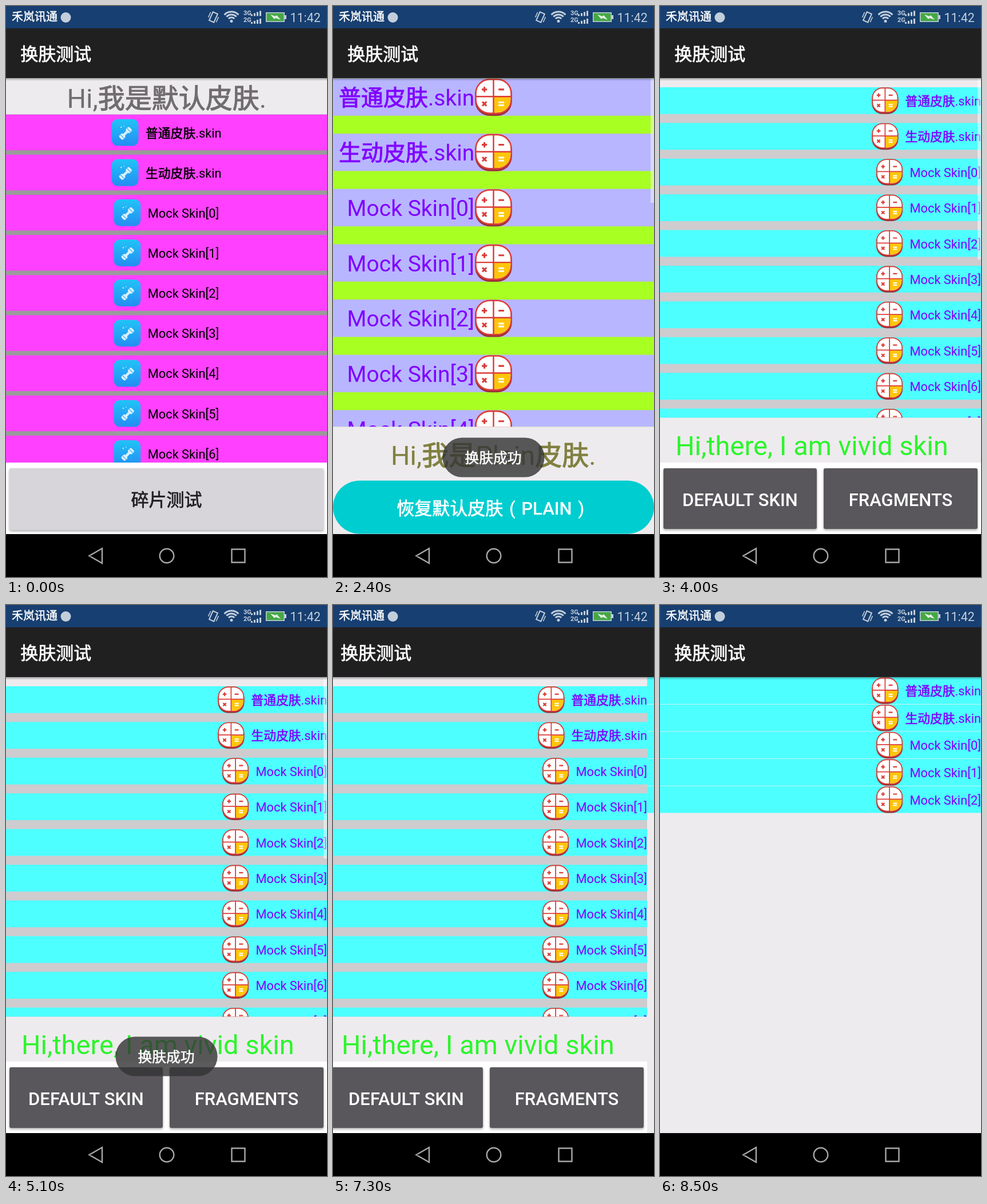
An HTML page with a canvas that plays this animation: 561 by 998 pixels, repeating every 8700 ms.

```html
<!DOCTYPE html>
<html lang="zh-CN">
<head>
<meta charset="utf-8">
<title>换肤测试</title>
<style>
html, body { margin: 0; width: 100%; height: 100%; overflow: hidden; background: #000; }
canvas { display: block; width: 561px; height: 998px; }
</style>
</head>
<body>
<canvas id="stage" width="561" height="998"></canvas>
<script>
const ctx = document.getElementById('stage').getContext('2d');
const W = 561, LOOP = 8700;
const PAPER = '#eeebee', VIOLET = '#8000ff', CYAN = '#4dffff', PALE = '#c3cedb';
const FONT = 'Roboto, "Noto Sans CJK SC", "Noto Sans CJK", sans-serif';
const names = ['普通皮肤.skin', '生动皮肤.skin', ...Array.from({ length: 8 }, (_, i) => `Mock Skin[${i}]`)];

const clamp = v => Math.max(0, Math.min(1, v));

function rect(x, y, w, h, color) {
  ctx.fillStyle = color;
  ctx.fillRect(x, y, w, h);
}

function pill(x, y, w, h, r, color) {
  ctx.fillStyle = color;
  ctx.beginPath();
  ctx.roundRect(x, y, w, h, r);
  ctx.fill();
}

// Han runs get a thin stroke, for a weight between regular and bold
function text(str, x, y, size, color, weight = 400, align = 'left') {
  ctx.font = `${weight} ${size}px ${FONT}`;
  ctx.fillStyle = ctx.strokeStyle = color;
  ctx.lineWidth = size * 0.024;
  const runs = str.match(/\p{Script=Han}+|\P{Script=Han}+/gu);
  const widths = runs.map(run => ctx.measureText(run).width);
  const total = widths.reduce((a, b) => a + b);
  x -= { left: 0, center: total / 2, right: total }[align];
  runs.forEach((run, i) => {
    ctx.fillText(run, x, y);
    if (/\p{Script=Han}/u.test(run)) ctx.strokeText(run, x, y);
    x += widths[i];
  });
}

function line(color, width, ...points) {
  ctx.strokeStyle = color;
  ctx.lineWidth = width;
  ctx.beginPath();
  for (let i = 0; i < points.length; i += 4) {
    ctx.moveTo(points[i], points[i + 1]);
    ctx.lineTo(points[i + 2], points[i + 3]);
  }
  ctx.stroke();
}

function at(x, y, scale, draw) {
  ctx.save();
  ctx.translate(x, y);
  ctx.scale(scale, scale);
  draw();
  ctx.restore();
}

function clipped(y, h, draw) {
  ctx.save();
  ctx.beginPath();
  ctx.rect(0, y, W, h);
  ctx.clip();
  draw();
  ctx.restore();
}

// Icons use a 64-unit box
function calculator(x, y, size) {
  at(x, y, size / 64, () => {
    const red = '#dc3c38';
    pill(0.5, 3, 63, 61, 25, '#9c3038');
    pill(0.5, 0.5, 63, 60.5, 25, red);
    ctx.save();
    ctx.beginPath();
    ctx.roundRect(3, 3, 58, 55.5, 22.5);
    ctx.clip();
    rect(0, 0, 64, 64, '#fff');
    rect(32, 31, 32, 33, '#fdc60c');
    ctx.restore();
    line(red, 2.4, 32, 2, 32, 60, 2, 31, 62, 31);
    line(red, 3, 12, 19, 21, 19, 16.5, 14.5, 16.5, 23.5, 40.5, 19, 50, 19,
      13, 40, 20, 47, 20, 40, 13, 47);
    line('#fff', 3, 40.5, 41, 50, 41, 40.5, 46, 50, 46);
  });
}

function blueIcon(x, y, size) {
  at(x, y, size / 64, () => {
    const blue = ctx.createLinearGradient(0, 0, 0, 64);
    blue.addColorStop(0, '#20c4f6');
    blue.addColorStop(1, '#258cf2');
    pill(0, 0, 64, 64, 14, blue);
    ctx.translate(33, 34);
    ctx.rotate(-0.78);
    const glyph = '#d9f1ff';
    pill(-17, -6.5, 12, 13, 4, glyph);
    pill(5, -6.5, 12, 13, 4, glyph);
    rect(-6, -3, 12, 6, glyph);
    line('#2ea8f4', 1.5, -11, -6, -11, 6, 11, -6, 11, 6);
    ctx.rotate(0.78);
    rect(-12, -16, 3, 3, '#bfe8ff');
    rect(-5, -18, 2, 2, '#bfe8ff');
  });
}

function button(x, y, w, h, color, label, textColor) {
  ctx.save();
  ctx.shadowColor = 'rgba(0,0,0,.35)';
  ctx.shadowBlur = 4;
  ctx.shadowOffsetY = 2;
  pill(x, y, w, h, 3, color);
  ctx.restore();
  text(label, x + w / 2, 874, 31, textColor, 500, 'center');
}

function scrollbar(height, alpha) {
  rect(555, 126, 6, height, `rgba(255,255,255,${0.5 * alpha})`);
}

function appBar() {
  rect(0, 39, W, 87, '#212021');
  text('换肤测试', 25.3, 95, 31, '#fff');
  const shade = ctx.createLinearGradient(0, 126, 0, 131);
  shade.addColorStop(0, 'rgba(0,0,0,.3)');
  shade.addColorStop(1, 'rgba(0,0,0,0)');
  rect(0, 126, W, 5, shade);
}

function defaultSkin() {
  rect(0, 126, W, 672, PAPER);
  text('Hi,我是默认皮肤.', 106.5, 178, 47, '#706d70');
  clipped(189.5, 608.5, () => {
    rect(0, 189, W, 609, '#9b9a9b');
    names.slice(0, 9).forEach((name, i) => {
      const y = 189.7 + i * 70.15, inset = i < 2 ? 0 : 3.8;
      rect(0, y, W, 62.4, '#ff40ff');
      blueIcon(184.7 + inset, y + 8, 46.8);
      text(name, 244 + inset, y + 39.8, 21.8, '#000');
    });
  });
  rect(0, 798, W, 125, '#fff');
  button(6, 808, 549, 108, '#d7d5d9', '碎片测试', '#201f20');
}

function plainSkin(t) {
  clipped(126, 609.5, () => {
    rect(0, 126, W, 610, '#a8ff22');
    names.slice(0, 7).forEach((name, i) => {
      const y = 126.4 + i * 96.65;
      rect(0, y, W, 65.4, '#b8b6ff');
      text(name, 247.2, y + 47.3, 39, VIOLET, 400, 'right');
      calculator(247.7, y, 65.6);
    });
  });
  scrollbar(218, 1 - clamp((t - 2380) / 300));
  rect(0, 735.5, W, 188, PAPER);
  text('Hi,我是Plain皮肤.', 101, 802, 47, '#808040');
  pill(0, 829.5, W, 93, 46.5, '#00cdd0');
  text('恢复默认皮肤\u2004(\u2004PLAIN\u2004)\u2004', 280.5, 889, 31, '#fff', 500, 'center');
}

function vividRow(name, y, i) {
  rect(0, y, W, 46.8, CYAN);
  calculator(i < 2 ? 370 : 377.7, y, 46.8);
  text(name, W, y + 32, 21.8, VIOLET, 400, 'right');
}

function vividSkin(t) {
  rect(0, 126, W, 672, PAPER);
  clipped(126, 593.5, () => {
    rect(0, 142, W, 578, '#cecccf');
    names.forEach((name, i) => vividRow(name, 142 + i * 62.4, i));
  });
  scrollbar(317, 1 - clamp((t - 5080) / 300));
  text('Hi,there, I am vivid skin', 27, 785, 47, '#2cf52c');
  rect(0, 798, W, 125, '#fff');
  button(6, 808, 268, 106, '#59575b', 'DEFAULT SKIN', '#fff');
  button(286, 808, 269, 106, '#59575b', 'FRAGMENTS', '#fff');
}

function fragments() {
  rect(0, 126, W, 797, PAPER);
  names.slice(0, 5).forEach((name, i) => vividRow(name, 126.2 + i * 47.6, i));
}

function page(x, content, t) {
  at(x, 0, 1, () => {
    content(t);
    appBar();
  });
}

function statusBar() {
  rect(0, 0, W, 39, '#173f71');
  text('禾岚讯通', 10, 26, 20, '#fff', 500);
  pill(95.5, 11, 18, 18, 9, PALE);

  ctx.strokeStyle = PALE;
  ctx.lineWidth = 2;
  at(362.5, 19.5, 1, () => {
    ctx.rotate(0.42);
    ctx.strokeRect(-4.5, -8, 9, 16);
    line(PALE, 1.5, -8, -6, -8, 4, 8, -4, 8, 6);
  });
  ctx.lineWidth = 3;
  for (const r of [7, 12, 17]) {
    ctx.beginPath();
    ctx.arc(394, 27, r, -Math.PI * 0.76, -Math.PI * 0.24);
    ctx.stroke();
  }
  pill(391.5, 24, 5, 5, 2.5, PALE);

  text('3G', 415, 15.5, 11, PALE, 700);
  text('2G', 415, 27.5, 11, PALE, 700);
  for (let i = 0; i < 4; i++) {
    const h = 3 + i * 2;
    rect(428 + i * 5, 17.5 - h, 3, h, PALE);
    rect(428 + i * 5, 31 - h, 3, h, PALE);
  }

  rect(454, 11, 33, 17, PALE);
  rect(487, 16, 3, 7, PALE);
  rect(455.5, 12.5, 30, 14, '#45a845');
  ctx.fillStyle = '#e4f3e4';
  ctx.fill(new Path2D('M462 15 L471 18 L473 16 L480 24 L471 21 L469 23 Z'));
  text('11:42', 496.5, 28, 21.4, PALE);
}

function navBar() {
  rect(0, 923, W, 75, '#000');
  ctx.strokeStyle = '#a9a8a9';
  ctx.lineWidth = 2.4;
  ctx.beginPath();
  ctx.moveTo(145.5, 961);
  ctx.lineTo(168, 948);
  ctx.lineTo(168, 974);
  ctx.closePath();
  ctx.moveTo(293.5, 961);
  ctx.arc(281, 961, 12.3, 0, Math.PI * 2);
  ctx.rect(394.5, 949.5, 23, 23);
  ctx.stroke();
}

function toast(t, start) {
  const enter = clamp((t - start) / 500), leave = clamp((t - start - 1700) / 500);
  const alpha = (1 - (1 - enter) ** 2) * (1 - leave ** 2);
  if (alpha <= 0) return;
  ctx.globalAlpha = alpha;
  pill(191.5, 754.5, 178, 69, 34, 'rgba(50,50,52,.8)');
  text('换肤成功', 280, 799, 24.8, '#fff', 400, 'center');
  ctx.globalAlpha = 1;
}

function render(t) {
  if (t < 1150) page(0, defaultSkin, t);
  else if (t < 3850) page(0, plainSkin, t);
  else {
    const slide = (1 - Math.cos(Math.PI * clamp((t - 7270) / 330))) / 2;
    const shift = Math.round(W * slide);
    if (shift < W) page(-shift, vividSkin, t);
    if (shift > 0) page(W - shift, fragments, t);
  }
  statusBar();
  navBar();
  toast(t, 1500);
  toast(t, 4190);
}

const begin = performance.now();
function tick() {
  render((performance.now() - begin) % LOOP);
  requestAnimationFrame(tick);
}
tick();
</script>
</body>
</html>
```
